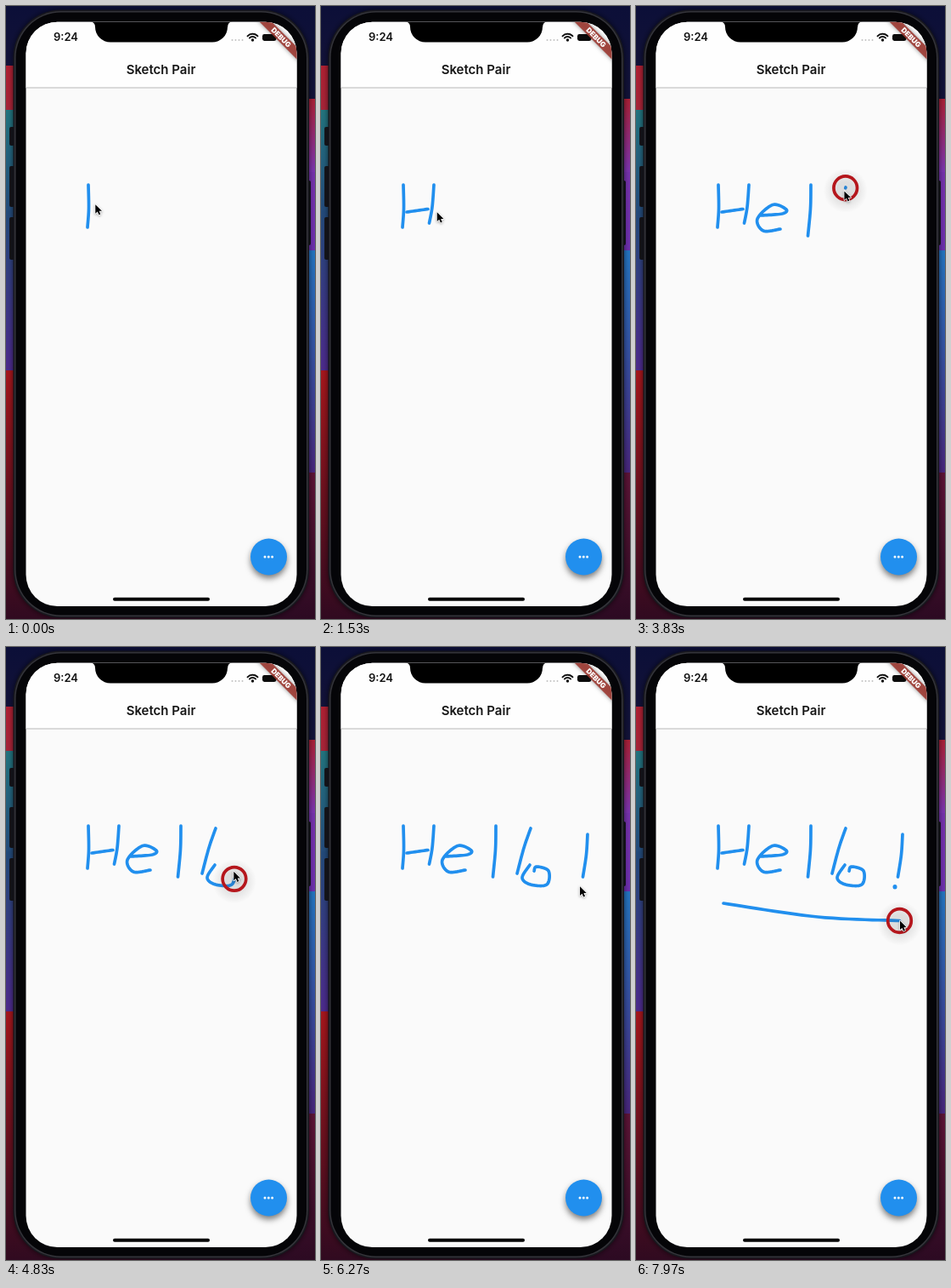
Recreate the animation shown at these times as an HTML page with a canvas. Size 364 by 720 pixels, loop 8000 ms.

```html
<!DOCTYPE html>
<html lang="en">
<head>
<meta charset="utf-8">
<title>Drawing demo</title>
<style>
html, body { margin: 0; width: 100%; height: 100%; overflow: hidden; background: #000; }
canvas { display: block; width: 364px; height: 720px; }
</style>
</head>
<body>
<canvas id="stage"></canvas>
<script>
const W = 364, H = 720, LOOP = 8000, LEAD = 45;
const INK = '#218fee', FONT = 'Inter, Roboto, sans-serif';
const ARROW = new Path2D('M0 0V10.6L2.5 8.4L4.2 12.2L6 11.4L4.4 7.7H7.7Z');
const canvas = document.getElementById('stage');
const ctx = canvas.getContext('2d');
const scale = window.devicePixelRatio || 1;
canvas.width = W * scale;
canvas.height = H * scale;

const ease = u => u * u * (3 - 2 * u);
const clamp = u => Math.min(1, Math.max(0, u));
const mix = (a, b, u) => a + (b - a) * u;
const last = list => list[list.length - 1];

// A pen stroke from start to end (ms) through a few key points.
const stroke = (start, end, ...points) => ({ start, end, path: trace(points) });

const strokes = [
  stroke(-500, -150, [97, 210], [97.5, 238], [96, 260]),
  stroke(290, 680, [133, 210], [131, 236], [127.5, 255]),
  stroke(1030, 1350, [101, 242], [126, 238.5]),
  stroke(1800, 2680, [147, 246], [172, 244], [177, 239], [161, 233.5], [143, 250], [150, 264], [170, 262]),
  stroke(2990, 3420, [206, 210], [205.5, 238], [202.5, 270]),
  stroke(3770, 4190, [247, 213], [239, 236], [231, 266]),
  stroke(4450, 5087, [246, 256], [237, 271], [247, 279], [266, 279], [268, 263], [254, 258], [251, 263]),
  stroke(5520, 5950, [314, 220], [312.5, 244], [308.5, 270]),
  stroke(6340, 6430, [305, 281.5], [305, 282]),
  stroke(6850, 8000, [103, 301], [214, 317], [311, 321.5])
];

function spline(a, b, c, d, u) {
  return b + 0.5 * u * (c - a + u * (2 * a - 5 * b + 4 * c - d + u * (3 * (b - c) + d - a)));
}

// Samples a smooth curve and notes the distance covered at each sample.
function trace(pts) {
  const out = [{ x: pts[0][0], y: pts[0][1], d: 0 }];
  for (let i = 0; i < pts.length - 1; i++) {
    const b = pts[i], c = pts[i + 1];
    const a = pts[i - 1] || b, e = pts[i + 2] || c;
    for (let k = 1; k <= 12; k++) {
      const [x, y] = [0, 1].map(j => spline(a[j], b[j], c[j], e[j], k / 12));
      const p = last(out);
      out.push({ x, y, d: p.d + Math.hypot(x - p.x, y - p.y) });
    }
  }
  return out;
}

const progress = (s, t) => ease(clamp((t - s.start) / (s.end - s.start)));

function pointAt(path, u) {
  const d = u * last(path).d;
  const i = Math.max(1, path.findIndex(p => p.d >= d - 1e-6));
  const a = path[i - 1], b = path[i];
  const k = (d - a.d) / (b.d - a.d);
  return { x: mix(a.x, b.x, k), y: mix(a.y, b.y, k) };
}

// Follows the stroke in progress, or glides with a slight bow to the next one.
function pointerAt(t) {
  const i = strokes.findIndex(s => t <= s.end);
  if (i < 0) return last(last(strokes).path);
  const s = strokes[i];
  if (t >= s.start) return pointAt(s.path, progress(s, t));
  const from = strokes[i - 1], a = last(from.path), b = s.path[0];
  const u = ease((t - from.end) / (s.start - from.end));
  const bow = u * (1 - u) * Math.min(0, b.y - a.y) * 0.5;
  return { x: mix(a.x, b.x, u) + bow, y: mix(a.y, b.y, u) + bow };
}

function box(x, y, w, h, r, fill) {
  ctx.beginPath();
  ctx.roundRect(x, y, w, h, r);
  ctx.fillStyle = fill;
  ctx.fill();
}

function disc(x, y, r, fill) {
  ctx.beginPath();
  ctx.arc(x, y, r, 0, 7);
  ctx.fillStyle = fill;
  ctx.fill();
}

function label(text, x, y, font, fill) {
  ctx.font = font + ' ' + FONT;
  ctx.fillStyle = fill;
  ctx.fillText(text, x, y);
}

function withShadow(color, blur, dy, paint) {
  ctx.save();
  ctx.shadowColor = color;
  ctx.shadowBlur = blur * scale;
  ctx.shadowOffsetY = dy * scale;
  paint();
  ctx.restore();
}

// Each band is its top edge, first colour and last colour.
function wallpaper(x, bands) {
  bands.forEach(([top, from, to], i) => {
    const bottom = bands[i + 1]?.[0] ?? H;
    const g = ctx.createLinearGradient(0, top, 0, bottom);
    g.addColorStop(0, from);
    g.addColorStop(1, to);
    ctx.fillStyle = g;
    ctx.fillRect(x, top, W / 2, bottom - top);
  });
}

function drawPhone() {
  wallpaper(0, [[0, '#0c0f38', '#121238'], [70, '#ae2032', '#a62438'],
    [122, '#22747e', '#244c7c'], [240, '#224a7a', '#4c2a8c'], [428, '#a4161c', '#300a20']]);
  wallpaper(W / 2, [[0, '#0c0f38', '#121238'], [109, '#aa2036', '#7a34b0'],
    [195, '#7632ac', '#6c30ae'], [287, '#2474c0', '#48267c'], [548, '#5c1436', '#2c0a22']]);
  for (const [y, h] of [[142, 22], [188, 48], [248, 50]]) box(4, y, 6, h, 2, '#15151c');
  box(354, 205, 5, 76, 2, '#15151c');
  withShadow('rgba(0,0,0,.6)', 6, 0, () => box(8.5, 4.5, 348.5, 714, 56, '#18181e'));
  box(10, 6, 345.5, 711, 55, '#34343a');
  box(11.5, 7.5, 342.5, 708, 53.5, '#050508');
}

function drawNotch() {
  ctx.fillStyle = '#000';
  ctx.beginPath();
  ctx.moveTo(99, 18);
  ctx.lineTo(267, 18);
  ctx.quadraticCurveTo(261, 19, 261, 25);
  ctx.arcTo(261, 42.5, 243, 42.5, 18);
  ctx.arcTo(105, 42.5, 105, 24, 18);
  ctx.quadraticCurveTo(105, 19, 99, 18);
  ctx.fill();
}

function drawStatus() {
  label('9:24', 70.5, 37.5, '600 13px', '#111');
  for (let i = 0; i < 4; i++) disc(266.5 + i * 4, 40, 1, '#c2c2c2');
  ctx.lineWidth = 1.9;
  ctx.strokeStyle = '#111';
  for (const r of [5, 8.2]) {
    ctx.beginPath();
    ctx.arc(290.5, 41, r, -Math.PI * 0.76, -Math.PI * 0.24);
    ctx.stroke();
  }
  disc(290.5, 40, 1.7, '#111');
  box(302, 33, 16.5, 8, 2.4, '#0b0b0b');
}

function drawBanner() {
  ctx.save();
  ctx.translate(342, 19);
  ctx.rotate(Math.PI / 4);
  withShadow('rgba(0,0,0,.5)', 5, 0, () => {
    ctx.fillStyle = 'rgba(160,58,50,.88)';
    ctx.fillRect(-40, 20.2, 80, 10.2);
  });
  label('DEBUG', 0, 25.8, '900 8.4px', '#fff');
  ctx.restore();
}

function drawButton() {
  withShadow('rgba(0,0,0,.5)', 7, 4, () => disc(309.5, 647, 21.5, INK));
  for (const dx of [-4.3, 0, 4.3]) disc(309.3 + dx, 647, 1.5, '#f4fafe');
}

function drawScreen() {
  ctx.save();
  box(23.5, 18.7, 319, 686.3, 37, '#fafafa');
  ctx.clip();
  ctx.fillStyle = '#fefefe';
  ctx.fillRect(23, 18, 320, 78);
  ctx.fillStyle = '#bababa';
  ctx.fillRect(23, 95.5, 320, 1);
  label('Sketch Pair', 182.5, 75, '600 15px', '#151515');
  drawNotch();
  drawStatus();
  drawBanner();
  drawButton();
  box(126, 694.8, 114, 4, 2, '#050505');
  ctx.restore();
}

function drawStroke(s, t) {
  if (t < s.start) return;
  const u = progress(s, t), tip = pointAt(s.path, u), length = last(s.path).d;
  ctx.beginPath();
  ctx.moveTo(s.path[0].x, s.path[0].y);
  for (const p of s.path) if (p.d < u * length) ctx.lineTo(p.x, p.y);
  ctx.lineTo(tip.x, tip.y + 0.01);
  ctx.lineWidth = length < 2 ? 5 : 3.7;
  ctx.lineCap = ctx.lineJoin = 'round';
  ctx.strokeStyle = INK;
  ctx.stroke();
}

function drawRing(t) {
  if (!strokes.some(s => t >= s.start && t <= s.end)) return;
  const { x, y } = pointerAt(t);
  const glow = ctx.createRadialGradient(x, y + 3, 10, x, y + 3, 26);
  glow.addColorStop(0, 'rgba(70,70,70,.16)');
  glow.addColorStop(1, 'rgba(70,70,70,0)');
  disc(x, y + 3, 26, glow);
  ctx.beginPath();
  ctx.arc(x, y, 13.8, 0, 7);
  ctx.lineWidth = 3.7;
  ctx.strokeStyle = '#b5161c';
  ctx.stroke();
}

function drawCursor(t) {
  const { x, y } = pointerAt(t);
  ctx.save();
  ctx.translate(x, y);
  ctx.lineJoin = 'round';
  ctx.lineWidth = 1.5;
  ctx.strokeStyle = '#fff';
  withShadow('rgba(0,0,0,.35)', 3, 1, () => ctx.stroke(ARROW));
  ctx.fillStyle = '#000';
  ctx.fill(ARROW);
  ctx.restore();
}

function draw(now) {
  // The picture advances thirty times a second.
  const t = Math.floor((now % LOOP) * 0.03 + 0.1) / 0.03;
  ctx.setTransform(scale, 0, 0, scale, 0, 0);
  ctx.textAlign = 'center';
  ctx.textBaseline = 'middle';
  drawPhone();
  drawScreen();
  strokes.forEach(s => drawStroke(s, t));
  drawRing(t);
  drawCursor(t + LEAD);
}

let origin;
function tick(now) {
  origin ??= now;
  draw(now - origin);
  requestAnimationFrame(tick);
}
draw(0);
requestAnimationFrame(tick);
</script>
</body>
</html>
```
